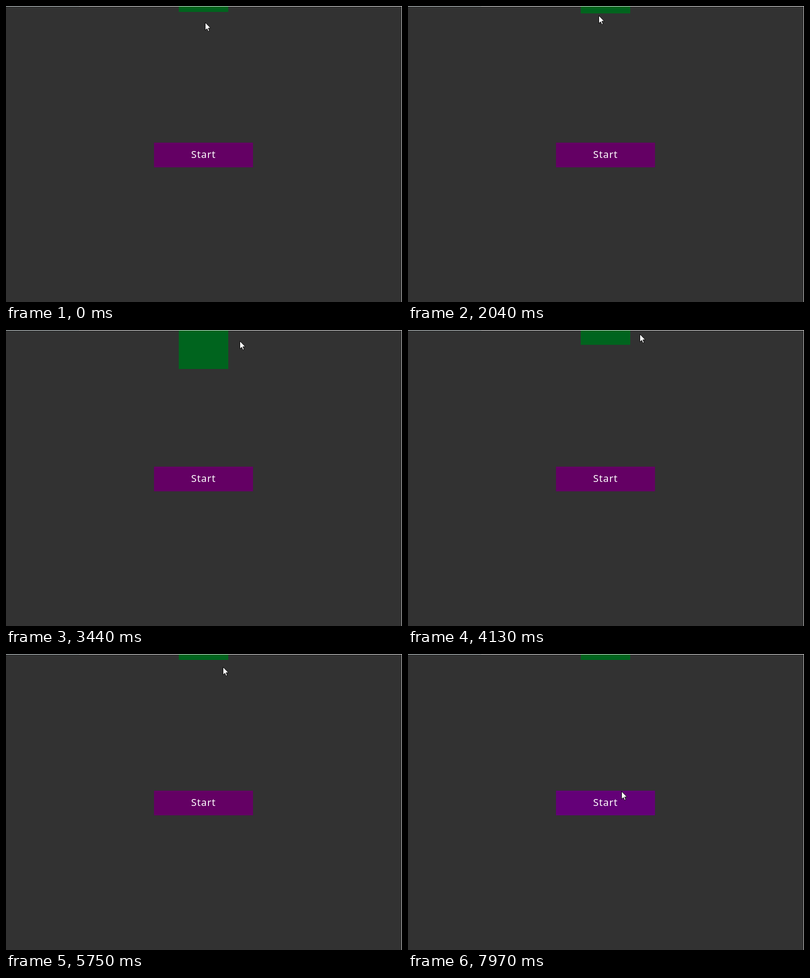
Write an HTML page with a canvas that moves like this. It is 800 px wide and 600 px high and loops after 8000 ms.

```html
<!DOCTYPE html>
<html lang="en">
<head>
<meta charset="utf-8">
<title>Slide-down panel</title>
<style>
  html, body { margin: 0; width: 100%; height: 100%; overflow: hidden; background: #323232; }
  canvas { display: block; }
</style>
</head>
<body>
<canvas id="stage" width="800" height="600"></canvas>
<script>
const LOOP = 8000;
const SPEED = 0.213; // panel travel in px per ms
const ctx = document.getElementById('stage').getContext('2d');
const button = { x: 299, y: 277, w: 200, h: 50 };

// ms, x, y of the pointer tip
const pointer = [
  [140, 402, 33], [290, 401, 13], [950, 397, 70], [985, 397, 70],
  [1140, 396, 155], [1790, 396, 155], [2040, 385, 19], [2090, 386, 12],
  [2620, 392, 14], [2780, 400, 83], [3010, 400, 83], [3440, 472, 22],
  [3540, 497, 19], [3740, 420, 20], [3980, 549, 7], [4210, 425, 8],
  [4430, 492, 12], [4640, 422, 14], [4800, 469, 19], [4920, 498, 12],
  [5300, 425, 5], [5430, 500, 20], [5750, 438, 26], [5860, 410, 19],
  [5990, 410, 19], [6430, 749, 588], [6640, 707, 534], [7300, 707, 534],
  [7610, 431, 282]
];

// ms at which the panel sets off, and the edge it heads for
const strokes = [
  [300, 98], [1170, 15], [2080, 99], [3345, 15], [3660, 99], [3870, 15],
  [4110, 99], [4340, 15], [4550, 99], [4758, 15], [5220, 99], [5430, 12]
];

function pointerAt(t) {
  if (t >= 7966) return [431, 278];
  const i = pointer.findIndex(k => k[0] > t);
  if (i === 0) return pointer[0].slice(1);
  if (i < 0) return pointer.at(-1).slice(1);
  const a = pointer[i - 1], b = pointer[i];
  const f = (t - a[0]) / (b[0] - a[0]);
  return [1, 2].map(n => Math.round(a[n] + (b[n] - a[n]) * f));
}

function panelAt(t) {
  let edge = 12;
  strokes.forEach(([from, goal], i) => {
    const end = i + 1 < strokes.length ? strokes[i + 1][0] : LOOP;
    const reach = Math.max(0, Math.min(t, end) - from) * SPEED;
    edge += Math.sign(goal - edge) * Math.min(reach, Math.abs(goal - edge));
  });
  return Math.round(edge);
}

function rect(color, x, y, w, h) {
  ctx.fillStyle = color;
  ctx.fillRect(x, y, w, h);
}

const arrow = new Path2D('M.5 .5V16.2L4.1 12.9L6.6 18.5L9 17.4L6.6 11.9H11.5Z');

function drawPointer(x, y) {
  ctx.save();
  ctx.translate(x, y);
  ctx.fillStyle = '#fff';
  ctx.strokeStyle = '#000';
  ctx.fill(arrow);
  ctx.stroke(arrow);
  ctx.restore();
}

function draw(t) {
  const [x, y] = pointerAt(t);
  const b = button;
  const hover = x >= b.x && x < b.x + b.w && y >= b.y && y < b.y + b.h;

  rect('#323232', 0, 0, 800, 600);
  rect('#00641e', 349, 1, 100, panelAt(t) - 1);
  rect(hover ? '#640078' : '#640064', b.x, b.y, b.w, b.h);
  ctx.fillStyle = '#fff';
  ctx.font = '20px "Noto Sans", "Open Sans", sans-serif';
  ctx.letterSpacing = '1px';
  ctx.fillText('Start', 374, 308);

  // window edge
  rect('#f0f0f0', 0, 0, 800, 1);
  rect('#d5e0e2', 0, 0, 148, 1);
  rect('#c8c8c8', 799, 0, 1, 600);
  drawPointer(x, y);
}

const start = performance.now();
function tick() {
  draw((performance.now() - start) % LOOP);
  requestAnimationFrame(tick);
}
tick();
</script>
</body>
</html>
```
